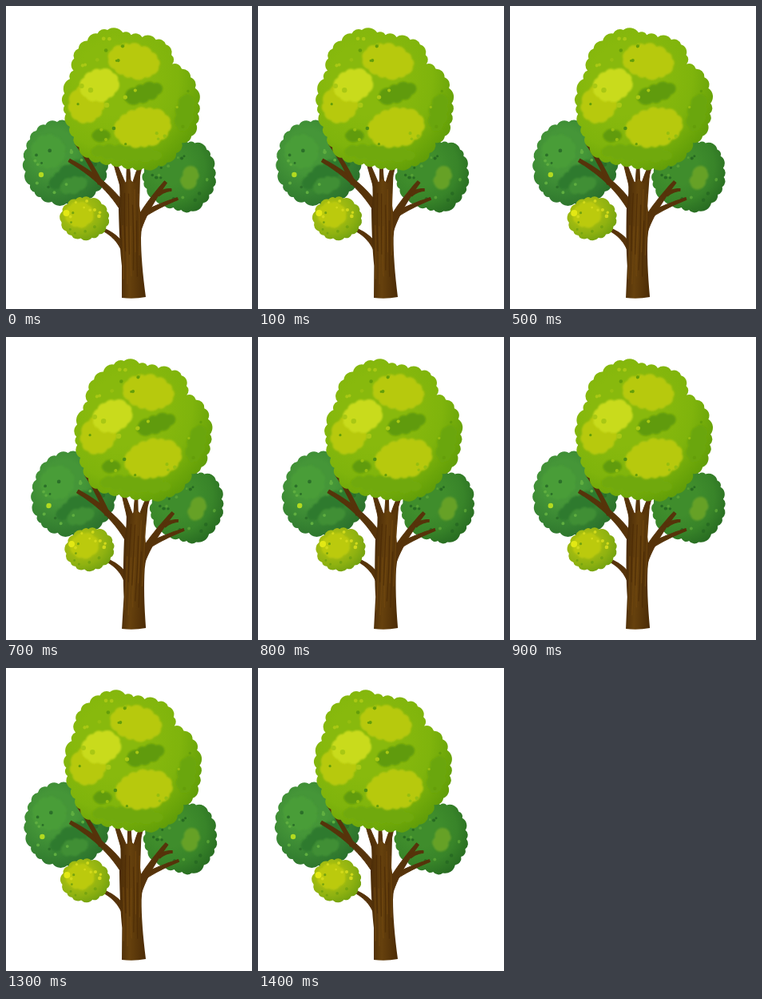
Write an HTML page that moves like this. It is 308 by 379 pixels and loops after 1.5 s.

```html
<!DOCTYPE html>
<html lang="en">
<head>
<meta charset="utf-8">
<title>Swaying tree</title>
<style>
html, body { margin: 0; width: 100%; height: 100%; overflow: hidden; background: #fff; }
svg { display: block; width: 308px; height: 379px; }
</style>
</head>
<body>
<svg viewBox="0 0 308 379">
  <defs>
    <filter id="soft" x="-20%" y="-20%" width="140%" height="140%"><feGaussianBlur stdDeviation="1.3"/></filter>
    <linearGradient id="bark">
      <stop offset="0" stop-color="#4a2b07"/><stop offset=".4" stop-color="#66410d"/><stop offset="1" stop-color="#4b2b06"/>
    </linearGradient>
  </defs>
  <g id="tree"></g>
</svg>
<script>
const tree = document.getElementById('tree');
const defs = document.querySelector('defs');
const TAU = Math.PI * 2;

let seed = 11;
function rnd() {
  seed = (seed * 16807) % 2147483647;
  return seed / 2147483647;
}

function add(parent, tag, attrs) {
  const el = document.createElementNS('http://www.w3.org/2000/svg', tag);
  for (const k in attrs) el.setAttribute(k, attrs[k]);
  parent.append(el);
  return el;
}

// Foliage gradient, lit from the upper left.
function shade(id, ...colors) {
  const g = add(defs, 'radialGradient', { id, cx: 0.36, cy: 0.36, r: 0.72 });
  colors.forEach((c, i) => add(g, 'stop', { offset: 0.35 + 0.65 * i / (colors.length - 1), 'stop-color': c }));
  return `url(#${id})`;
}

// Closed smooth curve through a few key points.
function ring(text) {
  const p = text.split(' ').map(s => s.split(',').map(Number));
  const n = p.length, out = [];
  for (let i = 0; i < n; i++) {
    const [a, b, c, d] = [-1, 0, 1, 2].map(k => p[(i + k + n) % n]);
    for (let t = 0; t < 1; t += 0.1) {
      out.push([0, 1].map(k => b[k] + t / 2 * (c[k] - a[k]
        + t * (2 * a[k] - 5 * b[k] + 4 * c[k] - d[k] + t * (3 * (b[k] - c[k]) + d[k] - a[k])))));
    }
  }
  return out;
}

function oval(cx, cy, rx, ry, tilt = 0) {
  const c = Math.cos(tilt * TAU / 360), s = Math.sin(tilt * TAU / 360);
  return Array.from({ length: 90 }, (_, i) => {
    const x = rx * Math.cos(i * TAU / 90), y = ry * Math.sin(i * TAU / 90);
    return [cx + x * c - y * s, cy + x * s + y * c];
  });
}

// Outline made of outward arcs, each roughly `size` wide.
function leaves(curve, fill, size, filter = 'none') {
  const gap = curve.map((a, i) => {
    const b = curve[(i + 1) % curve.length];
    return Math.hypot(b[0] - a[0], b[1] - a[1]);
  });
  const total = gap.reduce((a, b) => a + b);
  const n = Math.round(total / size);
  const cusps = [];
  let walked = 0, goal = 0;
  curve.forEach((pt, i) => {
    if (walked >= goal && cusps.length < n) {
      cusps.push(pt);
      goal = (cusps.length + (rnd() - 0.5) * 0.45) * total / n;
    }
    walked += gap[i];
  });
  let d = 'M' + cusps[0];
  cusps.forEach((a, i) => {
    const b = cusps[(i + 1) % cusps.length];
    const r = Math.hypot(b[0] - a[0], b[1] - a[1]) * 0.68;
    d += `A${r} ${r} 0 0 1 ${b}`;
  });
  add(tree, 'path', { d: d + 'Z', fill, filter });
}

const patch = (fill, ...shape) => leaves(oval(...shape), fill, 13, 'url(#soft)');
const dot = (fill, cx, cy, r) => add(tree, 'circle', { cx, cy, r, fill });

function speckle(fill, n, size, cx, cy, rx, ry) {
  for (let i = 0; i < n; i++) {
    const a = rnd() * TAU, k = 0.55 + 0.4 * rnd();
    dot(fill, cx + rx * k * Math.cos(a), cy + ry * k * Math.sin(a), size * (0.7 + 0.5 * rnd()));
  }
}

// Tapered branch along a quadratic curve.
function limb(x0, y0, cx, cy, x1, y1, w0, w1) {
  const left = [], right = [];
  for (let i = 0; i <= 12; i++) {
    const t = i / 12, u = 1 - t;
    const x = u * u * x0 + 2 * u * t * cx + t * t * x1;
    const y = u * u * y0 + 2 * u * t * cy + t * t * y1;
    const dir = Math.atan2(u * (cy - y0) + t * (y1 - cy), u * (cx - x0) + t * (x1 - cx));
    const w = (w0 * u + w1 * t) / 2, dx = w * Math.sin(dir), dy = w * Math.cos(dir);
    left.push([x + dx, y - dy]);
    right.unshift([x - dx, y + dy]);
  }
  add(tree, 'path', {
    d: 'M' + [...left, ...right].join('L') + 'Z',
    fill: '#56330a', stroke: '#56330a', 'stroke-linejoin': 'round'
  });
}

function sideLeaves() {
  leaves(ring('38,156 64,145 100,155 122,184 124,212 108,236 72,247 38,235 24,204 27,176'),
    shade('left', '#459638', '#378432', '#2a6f2b'), 14);
  patch('#2f7a2f', 84, 209, 34, 11, -30);
  patch('#4a9d38', 53, 182, 20, 20);
  patch('#418f35', 84, 224, 18, 9, -15);
  speckle('#2b7029', 9, 2, 74, 198, 46, 46);
  speckle('#5fae40', 8, 2, 62, 194, 38, 42);
  dot('#b2da20', 44, 211, 3.2);

  leaves(ring('200,180 231,171 253,182 261,217 253,238 234,256 204,250 181,236 173,208'),
    shade('right', '#3f8d2c', '#388429', '#276b21'), 13);
  patch('#66a128', 230, 215, 9, 17, 20);
  speckle('#276b22', 10, 2, 219, 214, 39, 38);
  speckle('#55a034', 7, 1.7, 219, 214, 38, 38);
}

function trunk() {
  limb(145, 250, 122, 217, 79, 193, 9, 4);
  limb(118, 222, 106, 196, 88, 172, 6, 3);
  limb(148, 228, 142, 212, 137, 198, 8, 4);
  limb(154, 228, 153, 210, 153, 198, 6, 3);
  limb(161, 228, 164, 212, 169, 198, 8, 4);
  limb(163, 280, 173, 254, 200, 220, 12, 4);
  limb(190, 236, 198, 230, 207, 230, 5, 3);
  limb(170, 262, 190, 250, 215, 241, 7, 3);
  limb(147, 303, 138, 286, 118, 278, 7, 3);
  add(tree, 'path', {
    d: 'M141 214Q144 236 141 254Q142 300 145 325L145 365Q160 367 175 364Q169 320 169 290Q171 270 167 250L168 212L161 222L154 216L148 222Z',
    fill: 'url(#bark)'
  });
  // bark grain
  for (let i = 0; i < 9; i++) {
    const x = 146 + i * 2.5, y = 226 + rnd() * 50, bend = rnd() * 4 - 2;
    add(tree, 'path', {
      d: `M${x} ${y}q${bend} 40 1 ${60 + rnd() * 25}`, fill: 'none',
      stroke: i % 2 ? '#4a2a06' : '#72490f', 'stroke-width': 1.3, 'stroke-linecap': 'round', opacity: 0.7
    });
  }
}

function bush() {
  leaves(oval(98.5, 265.5, 29.5, 25.5), shade('bush', '#a5bd11', '#8fb211', '#6f9f0f'), 11.5);
  patch('#bbca10', 92, 261, 17, 15);
  speckle('#d2da1a', 8, 2, 95, 264, 26, 22);
  speckle('#76a40f', 6, 1.7, 100, 268, 26, 22);
  dot('#e3e814', 75.5, 259, 4);
}

function crown() {
  leaves(ring('127,30 160,37 193,44 206,56 209,74 228,84 240,118 235,158 217,174 207,193 172,203 138,198 106,191 90,174 75,135 74,104 84,83 87,59 104,42'),
    shade('crown', '#88b90d', '#7fb40c', '#609d08'), 15);
  patch('#6ba60a', 224, 133, 10, 24, 10);
  patch('#70a90b', 150, 184, 46, 8, 4);
  patch('#609b09', 172, 109, 25, 10, -18);
  patch('#609b09', 119, 162, 12, 7);
  patch('#b7c90f', 160, 69, 32, 20, 12);
  patch('#b7c90f', 101, 122, 21, 24, 25);
  patch('#c9db1f', 117, 99, 24, 19, -15);
  patch('#b7c90f', 171, 152, 35, 23, -10);
  speckle('#a9c814', 9, 2.8, 126, 84, 44, 46);
  speckle('#96bf10', 8, 2, 160, 120, 76, 80);
  speckle('#649e0a', 8, 2, 160, 120, 76, 80);
  dot('#4c8f16', 135, 153, 2.3);
}

sideLeaves();
trunk();
bush();
crown();

// Lean right for seven steps, then back, hinged at the foot of the trunk.
const STEP = 100, STEPS = 15, LEAN = 0.0617, FOOT = 366;

function draw(now) {
  const n = Math.floor(now / STEP) % STEPS;
  const s = LEAN * Math.min(n, STEPS - 1 - n) / 7;
  tree.setAttribute('transform', `matrix(1 0 ${-s} 1 ${s * FOOT} 0)`);
  requestAnimationFrame(draw);
}
draw(performance.now());
</script>
</body>
</html>
```
